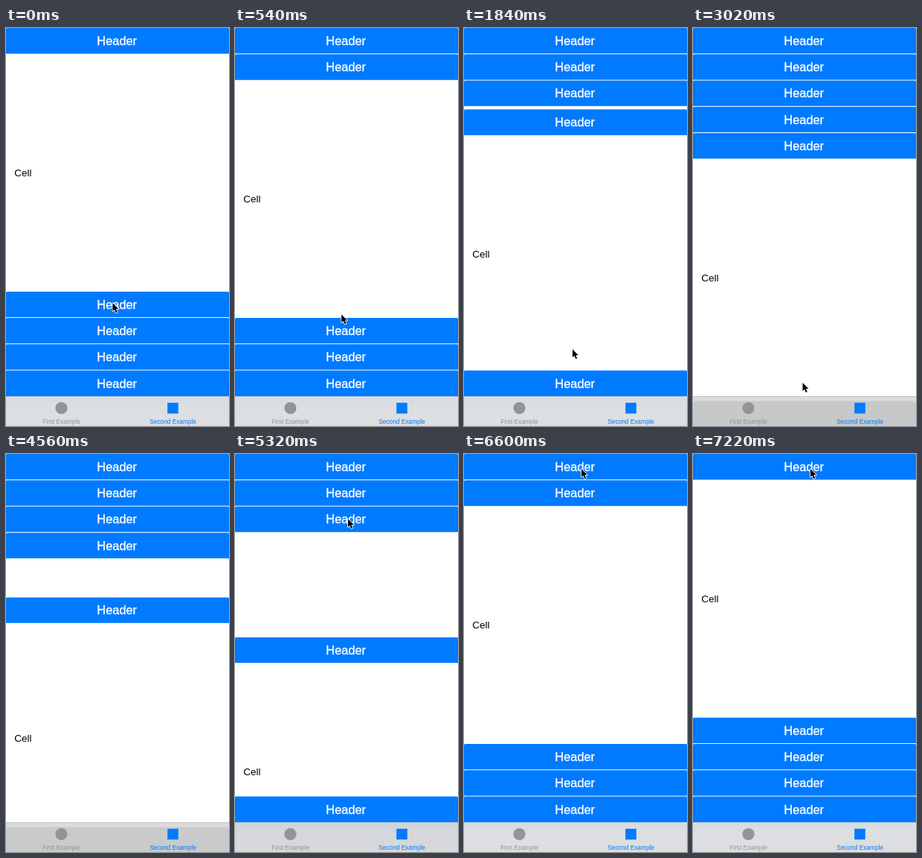
An HTML page with a canvas that plays this animation: 300x534 px, repeating every 7.78 s.

```html
<!DOCTYPE html>
<html lang="en">
<head>
<meta charset="utf-8">
<title>Accordion</title>
<style>
  html, body { margin: 0; width: 100%; height: 100%; overflow: hidden; background: #fff; }
  canvas { display: block; width: 300px; height: 534px; }
</style>
</head>
<body>
<canvas id="stage"></canvas>
<script>
const W = 300, H = 534, LOOP = 7780, STEP = 20;
const PITCH = 35.23, HEADER = 34.4, TRAVEL = 318.6, BAR_TOP = 494.3;
const SLIDE = 172;
const BLUE = '#007aff', FONT = '"Liberation Sans", Arial, sans-serif';

// Each slide moves one section up (+1) or down (-1).
const slides = [
  { at: 4, section: 1, dir: 1 },
  { at: 844, section: 2, dir: 1 },
  { at: 1681, section: 3, dir: 1 },
  { at: 2530, section: 4, dir: 1 },
  { at: 4512, section: 4, dir: -1 },
  { at: 5240, section: 3, dir: -1 },
  { at: 5984, section: 2, dir: -1 },
  { at: 6784, section: 1, dir: -1 }
];

// Pointer tip: time, x, y
const pointerPath = [
  [0, 143.5, 369], [470, 143.5, 369], [620, 143, 403], [1200, 143, 403],
  [1480, 146, 431], [2060, 146, 431], [2400, 147.5, 476], [3570, 147.5, 476],
  [3920, 151, 120], [4900, 151, 120], [5100, 152, 87], [5560, 152, 87],
  [5900, 153.5, 53], [6260, 153.5, 53], [6600, 158, 20], [LOOP, 158, 20]
];
const pointerHidden = t => t >= 4400 && t < 4900;

// Tab bar shade: time, amount, amount of the rounded panel
const shadePath = [
  [0, 0, 0], [2540, 0, 0], [2740, 1, 1], [4512, 1, 1],
  [4720, .6, 0], [5984, .6, 0], [6180, 0, 0], [LOOP, 0, 0]
];

const canvas = document.getElementById('stage');
const ctx = canvas.getContext('2d');
const ratio = window.devicePixelRatio || 1;
canvas.width = W * ratio;
canvas.height = H * ratio;
ctx.scale(ratio, ratio);

const clamp = x => Math.max(0, Math.min(1, x));
const smooth = x => x * x * (3 - 2 * x);

// Same curve as cubic-bezier(.42, 0, .58, 1)
function easeInOut(x) {
  if (x <= 0 || x >= 1) return clamp(x);
  let lo = 0, hi = 1;
  for (let i = 0; i < 20; i++) {
    const u = (lo + hi) / 2, v = 1 - u;
    if (1.26 * v * v * u + 1.74 * v * u * u + u * u * u < x) lo = u;
    else hi = u;
  }
  return smooth(lo);
}

function along(path, t) {
  const i = Math.max(1, path.findIndex(p => p[0] > t));
  const a = path[i - 1], b = path[i];
  const k = smooth(clamp((t - a[0]) / (b[0] - a[0])));
  return a.slice(1).map((v, n) => v + (b[n + 1] - v) * k);
}

function text(str, x, y, size, color, align = 'center', weight = 0) {
  ctx.font = `${size}px ${FONT}`;
  ctx.textAlign = align;
  ctx.fillStyle = ctx.strokeStyle = color;
  ctx.fillText(str, x, y);
  if (weight) {
    ctx.lineWidth = weight;
    ctx.strokeText(str, x, y);
  }
}

function card(y, h, r, color) {
  ctx.fillStyle = color;
  ctx.beginPath();
  ctx.roundRect(0, y, W, h, [r, r, 0, 0]);
  ctx.fill();
}

function drawSection(i, t) {
  let raised = i ? 0 : 1, lag = 0;
  for (const s of slides) {
    if (s.section !== i || t < s.at) continue;
    const k = easeInOut((t - s.at) / SLIDE);
    raised = s.dir > 0 ? k : 1 - k;
    lag = s.dir < 0 ? .1 * k * TRAVEL : 0;
  }
  const y = i * PITCH + (1 - raised) * TRAVEL;
  ctx.fillStyle = '#fff';
  ctx.fillRect(0, y - .8, W, H);
  card(y, HEADER, 1.5, BLUE);
  text('Header', 149.2, y + 23, 16.4, '#fff', 'center', .35);
  text('Cell', 11.3, y + 199 - lag, 13.5, '#000', 'left');
}

function drawBar(t) {
  const [shade, panel] = along(shadePath, t);
  const fill = ctx.createLinearGradient(0, BAR_TOP, 0, H);
  fill.addColorStop(0, '#d5dbe4');
  fill.addColorStop(.3, '#dcdee1');
  fill.addColorStop(1, '#dddfe1');
  ctx.fillStyle = fill;
  ctx.fillRect(0, BAR_TOP, W, H);
  ctx.fillStyle = `rgba(0,0,0,${.055 * shade * (1 - panel)})`;
  ctx.fillRect(0, BAR_TOP, W, H);
  if (panel > 0) {
    ctx.globalAlpha = panel;
    ctx.fillStyle = '#dadcdd';
    ctx.fillRect(0, BAR_TOP, W, H);
    card(500.5, 34, 5, '#c6c8ca');
    ctx.globalAlpha = 1;
  }
  ctx.fillStyle = 'rgba(90,95,100,.28)';
  ctx.fillRect(0, BAR_TOP - .3, W, .8);

  ctx.fillStyle = '#929496';
  ctx.beginPath();
  ctx.arc(74.5, 510, 8.1, 0, Math.PI * 2);
  ctx.fill();
  ctx.fillStyle = BLUE;
  ctx.fillRect(217.2, 502.8, 14.6, 14.5);
  text('First Example', 74.5, 531.2, 8.3, '#929496');
  text('Second Example', 224.6, 531.2, 8.3, BLUE);
}

function drawPointer(t) {
  if (pointerHidden(t)) return;
  const [x, y] = along(pointerPath, t);
  ctx.save();
  ctx.translate(x, y);
  ctx.beginPath();
  ctx.moveTo(0, 0);
  for (const [px, py] of [[0, 11], [2.5, 8.8], [4.3, 13], [6.2, 12.2], [4.4, 8.1], [7.8, 8.1]]) {
    ctx.lineTo(px, py);
  }
  ctx.closePath();
  ctx.lineJoin = 'round';
  ctx.lineWidth = 1.6;
  ctx.strokeStyle = '#fff';
  ctx.stroke();
  ctx.fillStyle = '#000';
  ctx.fill();
  ctx.restore();
}

function draw(t) {
  ctx.fillStyle = '#fff';
  ctx.fillRect(0, 0, W, H);
  for (let i = 0; i < 5; i++) drawSection(i, t);
  drawBar(t);
  drawPointer(t);
}

const start = performance.now();
function tick() {
  const t = (performance.now() - start) % LOOP;
  draw(Math.floor(t / STEP) * STEP);
  requestAnimationFrame(tick);
}
tick();
</script>
</body>
</html>
```
